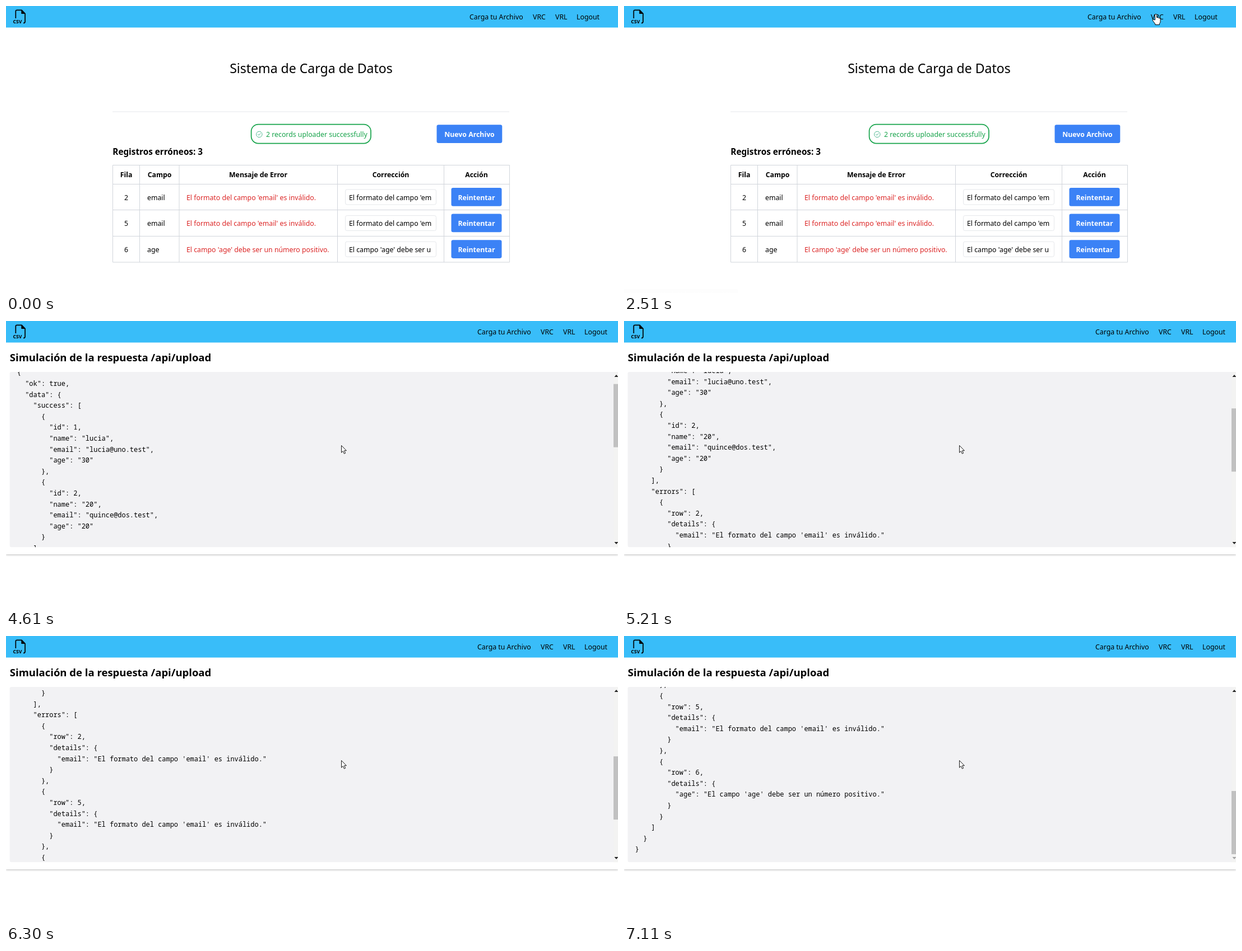
These frames come from a looping animation (1092 by 513 pixels, 7990 ms). An HTML page:

```html
<!DOCTYPE html>
<html lang="es">
<head>
<meta charset="utf-8">
<title>Carga de datos</title>
<style>
  html, body { margin: 0; width: 100%; height: 100%; overflow: hidden; background: #fff; }
  svg { display: block; width: 100vw; height: 100vh; }
  text { font: 12.3px "Noto Sans", "Open Sans", sans-serif; fill: #000; }
  .mid { text-anchor: middle; }
  .bold { font-weight: 700; }
  .title { font-size: 23.05px; }
  .heading { font-size: 18.5px; font-weight: 700; }
  .subhead { font-size: 15.3px; font-weight: 700; }
  .white { fill: #fff; }
  .red { fill: #dc2626; }
  .green { fill: #16a34a; }
  .code { font: 11.97px "Noto Sans Mono", "DejaVu Sans Mono", monospace; }
  .button { fill: #3b82f6; }
  .button.hover { fill: #1d4ed8; }
  .grid { fill: none; stroke: #d1d5db; }
  .off { display: none; }
</style>
</head>
<body>
<svg id="stage" viewBox="0 0 1092 513" preserveAspectRatio="none"></svg>
<script>
const LOOP = 7990;
const LINE = 19.6, NOTCH = 81.67, MAX_SCROLL = 477;

const label = (x, y, str, cls = '') => `<text x="${x}" y="${y}" class="${cls}">${str}</text>`;
const box = (x, y, w, h, r, attrs) =>
  `<rect x="${x}" y="${y}" width="${w}" height="${h}" rx="${r}" ${attrs}/>`;

const emailError = "El formato del campo 'email' es inválido.";
const ageError = "El campo 'age' debe ser un número positivo.";
const rows = [
  [2, 'email', emailError, "El formato del campo 'em"],
  [5, 'email', emailError, "El formato del campo 'em"],
  [6, 'age', ageError, "El campo 'age' debe ser u"]
];

function header() {
  const links = [[827, 'Carga tu Archivo'], [940, 'VRC'], [980, 'VRL'], [1018, 'Logout']];
  return box(0, 0, 1092, 38.5, 0, 'fill="#39bdf9"') +
    `<path d="M17.3 22V9.5Q17.3 7.3 19.5 7.3H28L34 13.5V28Q34 30.5 31 30.5" fill="none" stroke="#000" stroke-width="1.7"/>
     <path d="M27.3 7V14H34.5Z"/>
     <text x="12.5" y="30.7" class="bold" style="font-size:8.6px">CSV</text>
     <g id="nav">${links.map(([x, s]) => label(x, 24, s)).join('')}</g>`;
}

function tableRow([line, field, error, input], i) {
  const y = 318 + i * 46.6;
  return label(214.5, y + 28.5, line, 'mid') +
    label(252, y + 28.5, field) +
    label(322, y + 28.5, error, 'red') +
    box(605.5, y + 10, 162, 27, 3, 'fill="#fff" stroke="#e5e7eb"') +
    label(612, y + 28.5, input) +
    box(794.5, y + 7, 90, 32.7, 3.3, 'class="button"') +
    label(839.5, y + 28.5, 'Reintentar', 'mid bold white');
}

function tablePage() {
  const heads = [[214.5, 'Fila'], [274, 'Campo'], [450, 'Mensaje de Error'], [686.5, 'Corrección'], [839.5, 'Acción']];
  const columns = [238.5, 309, 591.5, 781.5].map(x => `M${x} 284.5V458`).join('');
  const lines = [318.5, 364.5, 411.5].map(y => `M190.5 ${y}H898.5`).join('');
  return label(544.5, 120, 'Sistema de Carga de Datos', 'mid title') +
    box(190, 188.5, 708, 1, 0, 'fill="#e5e7eb"') +
    box(437.6, 211.6, 213.4, 34, 12.5, 'fill="#fff" stroke="#16a34a" stroke-width="1.7"') +
    `<path d="M457 229a5.2 5.2 0 1 1-.01-.1M449.3 229.2l1.9 1.8 3.2-3.6" fill="none" stroke="#35ad80" stroke-width=".9"/>` +
    label(464, 234, '2 records uploader successfully', 'green') +
    box(768.5, 212.3, 116.8, 32.7, 3.3, 'id="newFile" class="button"') +
    label(827, 233.7, 'Nuevo Archivo', 'mid bold white') +
    label(190.3, 266, 'Registros erróneos: 3', 'subhead') +
    heads.map(([x, s]) => label(x, 306.3, s, 'mid bold')).join('') +
    `<path class="grid" d="M190.5 284.5H898.5V458H190.5Z${columns}${lines}"/>` +
    rows.map(tableRow).join('');
}

function jsonLines() {
  const response = {
    ok: true,
    data: {
      success: [
        { id: 1, name: 'lucia', email: 'lucia@uno.test', age: '30' },
        { id: 2, name: '20', email: 'quince@dos.test', age: '20' }
      ],
      errors: rows.map(([row, field, error]) => ({ row, details: { [field]: error } }))
    }
  };
  return JSON.stringify(response, null, 2).split('\n').map((line, i) => {
    const code = line.trimStart();
    return label(19.8 + (line.length - code.length) * 7.18, 117.6 + i * LINE, code, 'code');
  }).join('');
}

function responsePage() {
  return box(0, 38.5, 1092, 378.5, 0, 'fill="#fff" filter="url(#shadow)"') +
    label(6.8, 72.3, 'Simulación de la respuesta /api/upload', 'heading') +
    box(6.6, 91, 1100, 313.3, 3.3, 'fill="#f2f2f4"') +
    `<g clip-path="url(#codeArea)"><g id="json">${jsonLines()}</g></g>` +
    box(1084, 91, 8, 313.3, 0, 'fill="#f3f3f2"') +
    box(1084, 105, 8, 113, 0, 'id="thumb" fill="#c1c1c1"') +
    `<path id="up" d="M1085.5 100L1089 96L1092.5 100Z"/><path id="down" d="M1085.5 395L1089 399L1092.5 395Z"/>`;
}

document.getElementById('stage').innerHTML = `
  <defs>
    <clipPath id="codeArea">${box(6.6, 91, 1077, 313.3, 0, '')}</clipPath>
    <filter id="shadow" x="-5%" y="-5%" width="110%" height="115%">
      <feDropShadow dx="0" dy="1.5" stdDeviation="1.6" flood-color="#000" flood-opacity=".22"/>
    </filter>
  </defs>
  <g id="table">${tablePage()}</g>
  <g id="response">${responsePage()}</g>
  ${header()}
  <g id="status">
    ${box(-4, 506, 207.5, 12, 2, 'fill="#000"')}
    <text x="2" y="516.5" class="white" style="font-size:10px">respuesta simulada del servidor /api/upload</text>
  </g>
  <g id="pointer" stroke="#000" fill="#fff" stroke-linejoin="round">
    <path id="arrow" stroke-width=".9" d="M.5 .5V13.2L3.4 10.5L5.4 15.2L7.6 14.2L5.6 9.7H9.4Z"/>
    <path id="hand" d="M-1.6 10V1Q-1.6-.5 0-.5T1.6 1V5.5Q3.5 4.6 4.2 6.2Q6 5.6 6.5 7.1Q8 6.7 8 8.5V13Q8 15 6.3 16.5V18.5H-1.2V17L-5.6 11.2Q-6.3 9.2-4.2 9.1Z"/>
  </g>`;

const el = Object.fromEntries([...document.querySelectorAll('[id]')].map(node => [node.id, node]));
const show = (node, on) => node.classList.toggle('off', !on);
const clamp = v => Math.min(1, Math.max(0, v));
const ease = p => p * p * (3 - 2 * p);

// Time and hotspot of the pointer
const path = [
  [340, 1078, 462], [520, 1040, 330], [680, 985, 180], [820, 895, 128], [960, 800, 145],
  [1110, 728, 190], [1230, 768, 222], [1370, 802, 226], [1480, 811, 210], [1700, 818, 120],
  [1920, 827, 55], [2120, 880, 44], [2350, 949, 15], [2510, 949, 15], [2600, 955, 16],
  [3770, 955, 16], [3900, 880, 62], [4080, 700, 165], [4250, 610, 216], [4410, 610, 216],
  [4520, 598, 222], [LOOP, 598, 222]
];

// First and last change, number of steps, distance
const scrolls = [
  [4580, 4750, 6, NOTCH], [5110, 5280, 6, NOTCH], [5500, 5670, 6, NOTCH],
  [6190, 6360, 6, NOTCH], [6620, 6790, 6, NOTCH], [6900, 7110, 7, MAX_SCROLL - 5 * NOTCH]
];

function pointerAt(t) {
  const i = Math.max(1, path.findIndex(([time]) => time > t));
  const [t0, x0, y0] = path[i - 1], [t1, x1, y1] = path[i];
  const p = clamp((t - t0) / (t1 - t0));
  return [x0 + (x1 - x0) * p, y0 + (y1 - y0) * p];
}

function scrollAt(t) {
  return scrolls.reduce((sum, [start, end, steps, distance]) => {
    const step = Math.floor((t - start) / (end - start) * (steps - 1) + 1.1);
    return sum + distance * ease(clamp(t < start ? 0 : step / steps));
  }, 0);
}

function draw(t) {
  const second = t >= 3270;
  show(el.table, !second);
  show(el.response, second);
  el.nav.setAttribute('transform', `translate(${second ? 14 : 0} 0)`);
  el.newFile.classList.toggle('hover', t >= 1230 && t < 1520);

  const [x, y] = pointerAt(t);
  const overLink = t >= 2320 && t < 3800;
  show(el.pointer, t >= 340);
  show(el.arrow, !overLink);
  show(el.hand, overLink);
  el.pointer.setAttribute('transform', `translate(${x} ${y})`);
  el.status.setAttribute('opacity', clamp((t - 2510) / 300) * (1 - clamp((t - 3850) / 300)));

  const scroll = scrollAt(t);
  el.json.setAttribute('transform', `translate(0 ${-scroll})`);
  el.thumb.setAttribute('y', 105 + scroll * 172 / MAX_SCROLL);
  el.up.setAttribute('fill', scroll > 0 ? '#222' : '#a3a3a3');
  el.down.setAttribute('fill', scroll < MAX_SCROLL - .5 ? '#222' : '#a3a3a3');
}

const origin = performance.now();
function frame() {
  draw((performance.now() - origin) % LOOP);
  requestAnimationFrame(frame);
}
frame();
</script>
</body>
</html>
```
